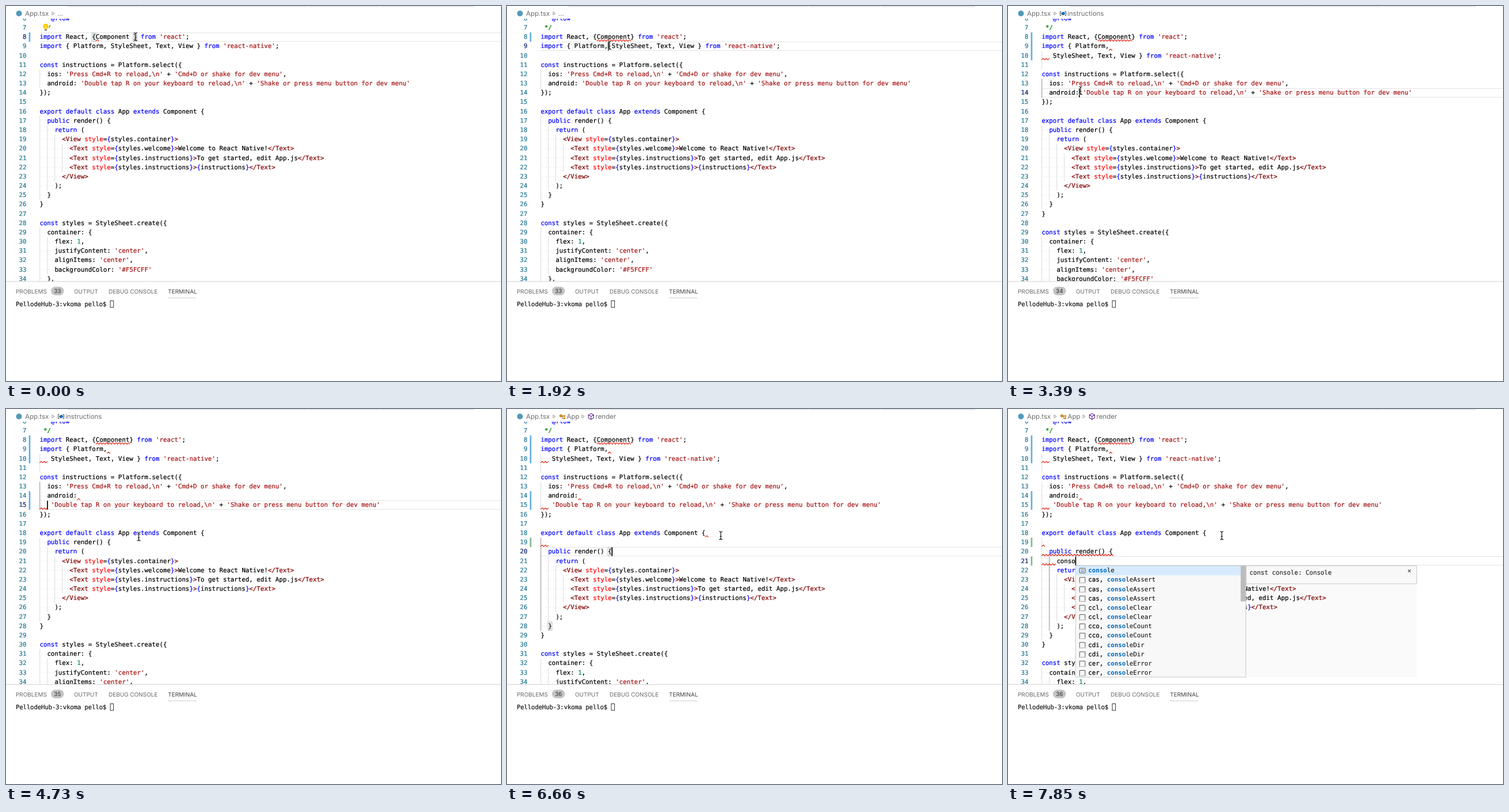
These frames come from a looping animation (859 by 652 pixels, 8 s). An HTML page:

```html
<!DOCTYPE html>
<html lang="en">
<head>
<meta charset="utf-8">
<title>Code editor</title>
<style>
html, body { margin: 0; width: 100%; height: 100%; overflow: hidden; background: #fff; }
svg { display: block; width: 859px; height: 652px; }
text { white-space: pre; text-rendering: geometricPrecision; }
.code { font: 10.79px "DejaVu Sans Mono", monospace; stroke-width: .22px; }
.term { letter-spacing: -.21px; }
.tab { font: 9.95px Inter, sans-serif; stroke-width: 0; }
.crumb { font: 11.5px Inter, sans-serif; stroke-width: 0; }
.hit { font-weight: bold; fill: #0066bf; }
</style>
</head>
<body>
<svg viewBox="0 0 859 652">
  <clipPath id="pane"><rect y="22" width="859" height="456.5"/></clipPath>
  <g id="tabs"></g>
  <g id="code" clip-path="url(#pane)"></g>
  <g id="crumbs"></g>
  <g id="panel"></g>
  <g id="mouse" fill="none">
    <path d="M-3-7Q0-7 0-5Q0-7 3-7M0-5V5M-3 7Q0 7 0 5Q0 7 3 7M-1.5 1.5h3" stroke="#fff" stroke-width="2.4"/>
    <path d="M-3-7Q0-7 0-5Q0-7 3-7M0-5V5M-3 7Q0 7 0 5Q0 7 3 7M-1.5 1.5h3" stroke="#111" stroke-width="1.2"/>
  </g>
</svg>
<script>
const LOOP = 8000, FRAME = 148;
const LEFT = 58.4, CHAR = 6.495, ROW = 16.17, FIRST = 6, BASE = 3.3;
const BLUE = '#66afe0', GREEN = '#81b88b';
const KEYWORD = '#0000ff', STRING = '#a31515', NUMBER = '#09885a', COMMENT = '#008000', TAG = '#800000', ATTR = '#ff0000';

const source = String.raw` * @flow
 */
import React, {Component } from 'react';
import { Platform, StyleSheet, Text, View } from 'react-native';

const instructions = Platform.select({
  ios: 'Press Cmd+R to reload,\n' + 'Cmd+D or shake for dev menu',
  android: 'Double tap R on your keyboard to reload,\n' + 'Shake or press menu button for dev menu'
});

export default class App extends Component {
  public render() {
    return (
      <View style={styles.container}>
        <Text style={styles.welcome}>Welcome to React Native!</Text>
        <Text style={styles.instructions}>To get started, edit App.js</Text>
        <Text style={styles.instructions}>{instructions}</Text>
      </View>
    );
  }
}

const styles = StyleSheet.create({
  container: {
    flex: 1,
    justifyContent: 'center',
    alignItems: 'center',
    backgroundColor: '#F5FCFF'
  },`.split('\n');

// Enter presses: row, column, indent of the new line
const breaks = [[9, 18, 2], [14, 10, 2], [18, 44, 2], [20, 19, 4]];

const m1 = [[8, 15, 24]];
const m2 = [...m1, [9, 18, 19], [10, 0, 2]];
const m3 = [...m2, [14, 10, 11], [15, 0, 2]];
const m4 = [...m3, [18, 44, 45], [19, 0, 2]];
const m5 = [...m3, [19, 0, 1], [20, 0, 19], [21, 0, 4]];
const b2 = [[8, 10, BLUE]], b3 = [...b2, [14, 15, BLUE]], b4 = [...b3, [19, 19, GREEN]];

// Each step changes part of the editor state; caret is an opacity
const steps = [
  [0, { row: 8, col: 25, caret: 0, bulb: true, trimmed: false, enters: 0, typed: '', popup: false, badge: 33,
        crumbs: ['...'], pairs: [[8, 14], [8, 25]], bars: [[8, 8, BLUE]], marks: [[8, 15, 16]], guide: null }],
  [140, { caret: .5 }],
  [290, { caret: 1 }],
  [590, { trimmed: true, col: 24, bulb: false, pairs: [[8, 14], [8, 24]] }],
  [730, { marks: m1 }],
  [1030, { bulb: true }],
  [1620, { row: 9, col: 18, pairs: [] }],
  [1770, { bulb: false }],
  [2060, { enters: 1, row: 10, col: 2 }],
  [2360, { bars: b2 }],
  [2510, { badge: 34, marks: m2 }],
  [3250, { row: 14, col: 10, guide: [0, 13, 14] }],
  [3390, { crumbs: ['instructions'] }],
  [3840, { enters: 2, row: 15, col: 2, guide: [0, 13, 15] }],
  [3990, { bars: b3 }],
  [4280, { badge: 35, marks: m3 }],
  [5330, { row: 18, col: 44, pairs: [[18, 43], [28, 0]], guide: null }],
  [5470, { crumbs: ['App'] }],
  [5920, { enters: 3, row: 19, col: 2, pairs: [], guide: [0, 19, 28] }],
  [6070, { bars: b4 }],
  [6220, { badge: 36, marks: m4 }],
  [6510, { row: 20 }],
  [6660, { col: 19, pairs: [[20, 18], [28, 2]], crumbs: ['App', 'render'] }],
  [6960, { enters: 4, row: 21, col: 4, pairs: [], guide: [2, 21, 28] }],
  [7110, { bars: [...b4, [21, 21, GREEN]] }],
  [7410, { typed: 'c', col: 5 }],
  [7560, { typed: 'con', col: 7, marks: m5, popup: true }],
  [7700, { typed: 'cons', col: 8 }],
  [7850, { typed: 'conso', col: 9 }]
];

// Pointer moves: start, end, x, y reached
const moves = [
  [880, 1470, 178, 68.5],
  [2510, 3100, 126, 147],
  [4280, 4730, 230, 222],
  [4730, 5180, 371, 220]
];

const el = id => document.getElementById(id);
const x = col => LEFT + col * CHAR;
const y = row => 54 + (row - 8) * ROW;
const esc = s => s.replace(/&/g, '&amp;').replace(/</g, '&lt;');
const text = (cls, tx, ty, s, fill = '#000', extra = '') =>
  `<text class="${cls}" x="${tx}" y="${ty}" fill="${fill}" stroke="${fill}" ${extra}>${esc(s)}</text>`;
const rect = (rx, ry, w, h, fill, extra = '') =>
  `<rect x="${rx}" y="${ry}" width="${w}" height="${h}" fill="${fill}" ${extra}/>`;
const path = (d, stroke, width = 1, fill = 'none') =>
  `<path d="${d}" stroke="${stroke}" stroke-width="${width}" fill="${fill}"/>`;

function getLines(s) {
  const lines = [...source];
  if (s.trimmed) lines[2] = lines[2].replace('Component }', 'Component}');
  for (const [row, col, indent] of breaks.slice(0, s.enters)) {
    const i = row - FIRST, line = lines[i];
    lines.splice(i, 1, line.slice(0, col), ' '.repeat(indent) + line.slice(col));
  }
  if (s.typed) lines[21 - FIRST] += s.typed;
  return lines.slice(0, 29);
}

function tokens(line) {
  let rule, colors;
  if (/^ \*/.test(line)) {
    rule = /(\*\/?)|(@\w+)/g;
    colors = [COMMENT, KEYWORD];
  } else if (/^\s*</.test(line)) {
    rule = /(<\/?\w+>?|>)|(style)(?==)|([{}])|[^<>{}\s=]+|=/g;
    colors = [TAG, ATTR, KEYWORD];
  } else {
    rule = /('[^']*')|\b(import|from|const|export|default|class|extends|public|return)\b|\b(\d+)\b|[^\s']+/g;
    colors = [STRING, KEYWORD, NUMBER];
  }
  return [...line.matchAll(rule)].map(m => {
    const kind = m.slice(1).findIndex(Boolean);
    return [m.index, m[0], kind < 0 ? '#000' : colors[kind]];
  });
}

function drawLine(line, row, prev, active) {
  const mid = y(row), indent = line.search(/\S|$/);
  let out = '', dots = '';
  const levels = line ? Math.floor(indent / 2) : +/^ +\S/.test(prev || '') * (row > 8);
  for (let i = 0; i < levels; i++) {
    out += rect(x(i * 2) - .2, mid - ROW / 2, 1, ROW + .1, '#d9d9d9');
  }
  for (let c = 0; c < line.length; c++) {
    if (line[c] === ' ') dots += `M${x(c + .5) - .5} ${mid}h1`;
  }
  out += path(dots, 'rgba(51,51,51,.24)');
  for (const [col, word, color] of tokens(line)) out += text('code', x(col), mid + BASE, word, color);
  return out + text('code', 35.4, mid + BASE, String(row), active ? '#0b216f' : '#237893', 'text-anchor="end"');
}

function squiggle([row, from, to]) {
  const base = y(row) + 7.2, end = x(to);
  let d = `M${x(from)} ${base}`;
  for (let px = x(from) + 2.7, up = true; px <= end + 1; px += 2.7, up = !up) d += `L${px} ${base - (up ? 2.5 : 0)}`;
  return path(d, '#e51400', 1.1);
}

function drawBulb() {
  return rect(63, 30, 11.5, 14, '#fff') +
    '<circle cx="69" cy="35.4" r="4.7" fill="#fc0"/>' +
    rect(67, 37, 4, 3, '#fc0') + rect(67, 40.4, 4, 2.4, '#777') +
    path('M67.4 35l1.6 1.6 1.6-1.6M69 36.6V40', '#fff', .8);
}

const popupBox = s => ({ left: x(s.col) + .4, top: y(s.row) + ROW / 2 + .2, height: ROW * 12 - .4 });

function drawPopup(s) {
  const { left, top, height } = popupBox(s);
  const items = ['cas Assert', 'cas Assert', 'cas Assert', 'ccl Clear', 'ccl Clear', 'cco Count', 'cco Count',
    'cdi Dir', 'cdi Dir', 'cer Error', 'cer Error'];
  const rest = 'console'.slice(s.typed.length);
  const label = (tx, ty, tail) => `<text class="code" x="${tx}" y="${ty}"><tspan class="hit">${s.typed}</tspan>${rest + tail}</text>`;
  let out = rect(left, top, 295.5, height, '#f8f8f8', 'stroke="#c8c8c8"') +
    rect(left + .5, top + .5, 286, ROW, '#d6ebff');
  const ix = left + 6.5;
  for (let i = 0; i < 12; i++) {
    const mid = top + 8.5 + i * ROW, base = mid + BASE;
    if (!i) {
      out += rect(ix + .5, mid - 4, 9.6, 8, '#fff', 'stroke="#424242" rx=".6"') +
        path(`M${ix + 2.6} ${mid - 1.2}h5.4m-5.4 2.6h5.4`, '#00539c') + label(left + 22, base, '');
    } else {
      const [key, tail] = items[i - 1].split(' ');
      out += path(`M${ix + .5} ${mid + 4}v-8.4h9.6v8.4`, '#555') +
        `<path d="M${ix} ${mid + 5}h10.6" stroke="#555" stroke-dasharray="1.5 1.5"/>` +
        text('code', left + 22, base, key + ',') + label(left + 22 + 5 * CHAR, base, tail);
    }
  }
  out += rect(left + 286.5, top + .5, 9, 61.5, '#bcbcbc');
  const doc = left + 296;
  return out + rect(doc, top, 296, 31.5, '#f8f8f8', 'stroke="#c8c8c8"') +
    text('code', doc + 5.8, top + 15.6, 'const console: Console', '#333') +
    path(`M${doc + 281} ${top + 6.8}l4.6 4.6m0-4.6l-4.6 4.6`, '#555', 1.2);
}

// Faint tint behind the code beside the list
function drawShade(s) {
  const { left, top, height } = popupBox(s);
  return rect(left + 296, top, 296, height, '#fafafa');
}

function drawCode(s) {
  const lines = getLines(s), mid = y(s.row), edge = Math.round(mid - 8);
  let out = s.popup ? drawShade(s) : '';
  out += path(`M58 ${edge + .5}h801m-801 15h801`, '#e4e4e4');
  for (const [row, col] of s.pairs) {
    out += rect(x(col) - .2, y(row) - 7.4, CHAR + .4, 14.8, 'rgba(0,100,0,.08)', 'stroke="#b9b9b9" stroke-width=".9"');
  }
  lines.forEach((line, i) => out += drawLine(line, i + FIRST, lines[i - 1], i + FIRST === s.row));
  if (s.guide) {
    const [col, from, to] = s.guide;
    out += rect(x(col) - .2, y(from) - ROW / 2, 1, (to - from + 1) * ROW, '#979797');
  }
  for (const [from, to, color] of s.bars) {
    out += rect(39.6, y(from) - ROW / 2, 2.7, (to - from + 1) * ROW, color);
  }
  out += s.marks.map(squiggle).join('');
  out += rect(x(s.col) - .3, mid - 7.6, 1.7, 15.2, '#000', `opacity="${s.caret}"`);
  if (s.bulb) out += drawBulb();
  if (s.popup) out += drawPopup(s);
  return out;
}

const chevron = cx => path(`M${cx - 2} 10.2l4 2.8-4 2.8z`, '#8a8a8a', .9);

const icons = {
  instructions: () => path('M92.5 9.6h-2v7h2M98.5 9.6h2v7h-2', '#424242') +
    path('M92.8 12l3-1.6 2.8 1.2v2.6l-3 1.6-2.8-1.3z', '#1a6fae', .8, '#1a6fae'),
  App: () => path('M93.4 9.2l3 2.4-2.8 2.8-3-2.5z', '#c98219', .8, '#d68a1c') + path('M95 12.4h3.4M96 12.6v3.6h2.4', '#8a6a35') +
    rect(98, 10.7, 3, 3, '#d68a1c') + rect(98, 14.7, 3, 3, '#d68a1c'),
  render: () => path('M145.8 8l4.6 2.3v5.2l-4.6 2.5-4.6-2.5v-5.2zM141.2 10.3l4.6 2.4 4.6-2.4M145.8 12.7V18', '#652d90', 1.1)
};

function drawCrumbs(s) {
  const places = { '...': 89, instructions: 103, App: 103.5, render: 153.5 };
  let out = '<circle cx="22.5" cy="13" r="5" fill="#519aba"/>' + text('crumb', 33, 17, 'App.tsx', '#6c6c6c') + chevron(82);
  for (const name of s.crumbs) {
    if (icons[name]) out += icons[name]();
    if (name === 'render') out += chevron(132);
    out += text('crumb', places[name], 17, name, '#6c6c6c');
  }
  return out;
}

function drawPanel(s) {
  return rect(0, 478.5, 859, 1, '#cfcfcf') +
    text('tab', 17, 499.5, 'PROBLEMS', '#6a6a6a') +
    rect(78, 488, 22.5, 15, '#c4c4c4', 'rx="7.5"') +
    text('tab', 89.3, 499.3, String(s.badge), '#333', 'text-anchor="middle"') +
    text('tab', 118, 499.5, 'OUTPUT', '#6a6a6a') +
    text('tab', 178, 499.5, 'DEBUG CONSOLE', '#6a6a6a') +
    text('tab', 281, 499.5, 'TERMINAL', '#424242') +
    rect(281, 507, 49.5, 1, '#cdcdcd') +
    text('code term', 17, 521.6, 'PellodeHub-3:vkoma pello$', '#1e1e1e') +
    rect(181, 512.5, 5.6, 11.5, 'none', 'stroke="#333"');
}

function pointer(t) {
  const now = Math.floor((t + 8) / FRAME) * FRAME;
  let px = 225, py = 53.5;
  for (const [from, to, tx, ty] of moves) {
    const k = Math.min(1, Math.max(0, (now + 8 - from) / (to - from)));
    const e = k > .97 ? 1 : k * k * (3 - 2 * k);
    px += (tx - px) * e;
    py += (ty - py) * e;
  }
  return [px, py];
}

el('tabs').innerHTML = [[107, 126], [234, 288.5], [524, 124.5], [650, 162]].map(([tx, w]) => rect(tx, 0, w, 2, '#ebebeb')).join('');

let shown = -1;
const start = performance.now();
function tick() {
  const t = (performance.now() - start) % LOOP;
  const count = steps.filter(([at]) => at <= t).length;
  if (count !== shown) {
    shown = count;
    const state = Object.assign({}, ...steps.slice(0, count).map(step => step[1]));
    el('code').innerHTML = drawCode(state);
    el('crumbs').innerHTML = drawCrumbs(state);
    el('panel').innerHTML = drawPanel(state);
  }
  el('mouse').setAttribute('transform', `translate(${pointer(t)})`);
  requestAnimationFrame(tick);
}
tick();
</script>
</body>
</html>
```
